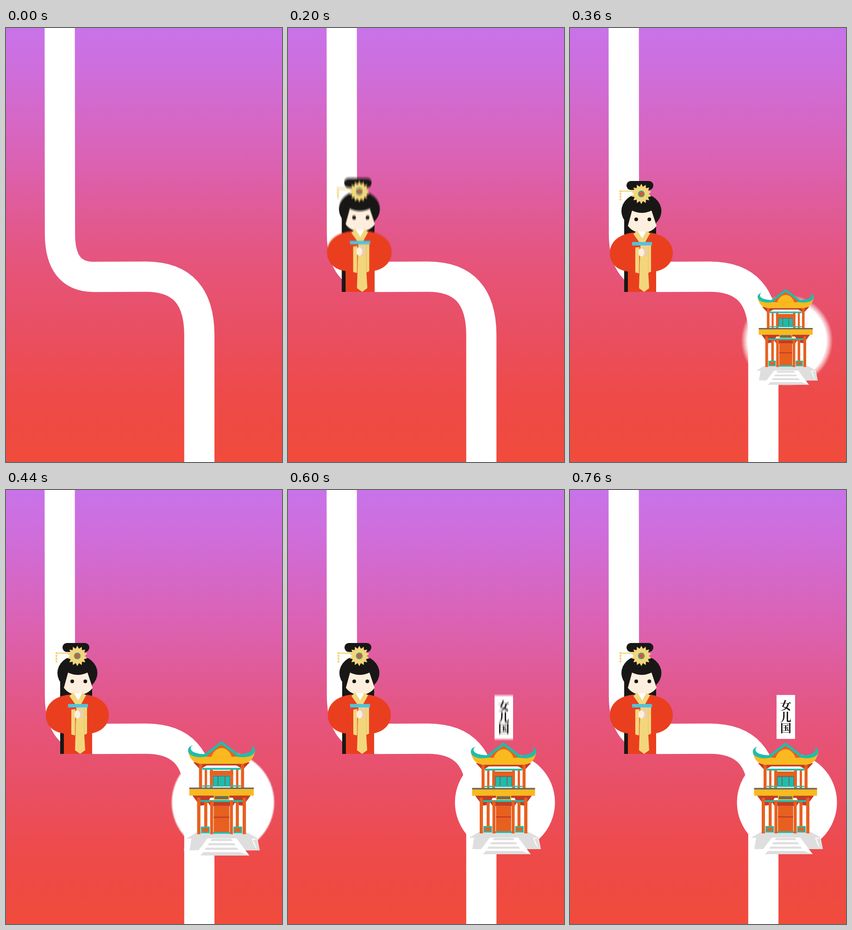
An HTML page with a canvas that plays this animation: 596 by 939 pixels, repeating every 0.8 s.

```html
<!DOCTYPE html>
<html lang="zh">
<head>
<meta charset="utf-8">
<style>
  html, body { margin: 0; width: 100%; height: 100%; overflow: hidden; }
  canvas { display: block; }
</style>
</head>
<body>
<canvas id="stage" width="596" height="939"></canvas>
<script>
const W = 596, H = 939, LOOP = 800, STEP = 40, SHUTTER = 20, SAMPLES = 10;
const screen = document.getElementById('stage').getContext('2d');
const buffer = document.createElement('canvas');
buffer.width = W;
buffer.height = H;
const layer = buffer.getContext('2d');

const BLACK = '#181716', RED = '#ea3f1e', CREAM = '#fdeedd', GOLD = '#f3d67c';
const ORANGE = '#e8601f', BRICK = '#c23c26', YELLOW = '#f9b91f', TEAL = '#1fbdac';
const STONE = '#dedede', SLATE = '#6c6a60';

// [ms, value] keys, linear in between
const POP = [[0, 0], [120, .857], [160, 1.107], [260, .9], [310, 1]];
const LABEL_Y = [[580, 8], [600, 1], [640, -13], [680, -6], [720, 3], [750, 0]];
const PAGODA_START = 240, LABEL_START = 600;

function track(keys, t) {
  if (t <= keys[0][0]) return keys[0][1];
  for (let i = 1; i < keys.length; i++) {
    const [t0, v0] = keys[i - 1], [t1, v1] = keys[i];
    if (t <= t1) return v0 + (v1 - v0) * (t - t0) / (t1 - t0);
  }
  return keys[keys.length - 1][1];
}

function fill(c, color, d) {
  c.fillStyle = color;
  c.fill(new Path2D(d));
}

function stroke(c, color, width, d) {
  c.strokeStyle = color;
  c.lineWidth = width;
  c.stroke(new Path2D(d));
}

function box(c, color, x0, y0, x1, y1) {
  c.fillStyle = color;
  c.fillRect(x0, y0, x1 - x0, y1 - y0);
}

function oval(c, color, x, y, rx, ry = rx) {
  c.fillStyle = color;
  c.beginPath();
  c.ellipse(x, y, rx, ry, 0, 0, Math.PI * 2);
  c.fill();
}

function scaled(c, x, y, s, draw) {
  if (s <= 0) return;
  c.save();
  c.translate(x, y);
  c.scale(s, s);
  c.translate(-x, -y);
  draw(c);
  c.restore();
}

const sky = layer.createLinearGradient(0, 0, 0, H);
[[0, '#c873e9'], [.11, '#cf6dda'], [.32, '#dc61b0'], [.45, '#e15990'],
 [.55, '#e6547a'], [.7, '#e94f62'], [.85, '#ee4a48'], [1, '#f04b3b']]
  .forEach(([at, color]) => sky.addColorStop(at, color));

function drawBackground(c) {
  box(c, sky, 0, 0, W, H);
  stroke(c, '#fff', 65.3, 'M116 -5L116.5 445C116.5 507 140 538.5 190 538.5L302 538C380 538 417.5 580 417.5 665V945');
}

function drawFlower(c, x, y) {
  const points = 14;
  c.fillStyle = GOLD;
  c.beginPath();
  for (let i = 0; i < points * 2; i++) {
    const r = i % 2 ? 16 : 22, a = i * Math.PI / points - Math.PI / 2;
    c.lineTo(x + r * Math.cos(a), y + r * Math.sin(a));
  }
  c.fill();
  oval(c, '#4a9f86', x, y, 7.3);
  oval(c, '#e2532c', x, y, 4.6);
}

function drawDoll(c) {
  // hair and face
  box(c, BLACK, 117, 400, 186, 571);
  c.fillStyle = BLACK;
  c.beginPath();
  c.roundRect(122, 331, 58, 19.5, 9.7);
  c.fill();
  oval(c, BLACK, 154.2, 396, 43.2, 38);
  fill(c, CREAM, 'M134 395Q155 405 176 395L187 428Q176 443 156 443Q136 443 125 428Z');
  oval(c, BLACK, 143, 414, 4);
  oval(c, BLACK, 171.3, 414, 4);

  // hairpin
  stroke(c, GOLD, 2.6, 'M108 353H142');
  for (let i = 0; i < 4; i++) oval(c, GOLD, 109, 353 + i * 6, 2.4);
  drawFlower(c, 154, 359);

  // robe
  box(c, RED, 125, 470, 186, 571);
  fill(c, RED, 'M154 442.5C192 440 222 457 222 487C222 512 200 526 180 527H128C106 526 86 512 86 487C86 457 116 440 154 442.5Z');
  fill(c, '#fff', 'M145 440H166L156 457Z');
  fill(c, GOLD, 'M137 446L145 438L156 455L165 439L173 444L162 464H150Z');
  fill(c, GOLD, 'M141 475L150 474L149 531L141 529Z');
  fill(c, GOLD, 'M152 470H175V527L169 530L171 563L160 571L149 563Z');
  stroke(c, '#dfbd5f', .8, 'M169 472V530M151 500L150 530');
  box(c, '#51c3dc', 134, 463, 177, 470.5);
  fill(c, '#ebcdae', 'M154 474H167V492L158 495Z');
  oval(c, CREAM, 154, 485.5, 6.5, 9);
}

function drawPagodaHalf(c) {
  // upper storey
  fill(c, BRICK, 'M406 591H466V598H434L420 606Z');
  box(c, ORANGE, 418, 594, 424.5, 645);
  box(c, ORANGE, 430, 604, 435, 645);
  box(c, ORANGE, 441, 604, 447, 645);
  box(c, TEAL, 425, 603, 466, 607);
  box(c, ORANGE, 441, 609, 466, 619);
  box(c, SLATE, 447, 619, 466, 641);
  box(c, TEAL, 448.5, 621, 457, 640);
  box(c, TEAL, 459, 621, 466, 640);
  box(c, TEAL, 425, 640, 466, 642.5);

  // balcony and lower storey
  fill(c, BRICK, 'M404 661H466V666H442L434 681L420 683Z');
  box(c, SLATE, 397.5, 644.5, 466, 648);
  box(c, YELLOW, 397.5, 648, 466, 661.5);
  box(c, TEAL, 421, 671, 466, 675);
  fill(c, BRICK, 'M436 675H446V690Z');
  box(c, ORANGE, 429, 675, 435.5, 728);
  box(c, TEAL, 422, 727, 440.5, 741);
  box(c, ORANGE, 425, 730, 438, 738);
  box(c, ORANGE, 414, 666, 421, 743);
  box(c, ORANGE, 441.5, 672, 448, 743);

  // roof
  fill(c, ORANGE, 'M466 547L424 581H466Z');
  stroke(c, TEAL, 5.5, 'M467 548.5L431 576');
  fill(c, YELLOW, 'M394.5 564C403 577 425 580 466 580V594.5H422Q411 594 404 587Q396 579 394.5 564Z');
  fill(c, TEAL, 'M405 556C398 559 399 567 410 571Q426 576 440 572L434 579Q413 583 401 576C391 569 394 557 405 556Z');
}

function drawPagoda(c) {
  // platform and stairs
  fill(c, '#fff', 'M391 752H541L546 777H386Z');
  fill(c, STONE, 'M412 740H520L543 752.5H391Z');
  fill(c, STONE, 'M402 752H436L417 777H398Z');
  fill(c, STONE, 'M497 752H529L534 766L541 777H515Z');
  fill(c, '#fff', 'M437 752H497L524 788H421Z');
  fill(c, STONE, 'M445 753H486L489 757.5H442Z M439 762H492L495 766.5H436Z M433 771.5H498L501 776H430Z M427 781H505L524 788H421Z');
  fill(c, STONE, 'M540 753L545.5 777H541L532 755Z');

  // door
  box(c, BRICK, 448, 675, 484, 684);
  box(c, ORANGE, 449, 683, 482, 741);
  box(c, BRICK, 449, 706, 482, 708.5);

  drawPagodaHalf(c);
  c.save();
  c.transform(-1, 0, 0, 1, 931, 0);
  drawPagodaHalf(c);
  c.restore();

  box(c, TEAL, 448, 738.5, 483, 742);
  box(c, YELLOW, 449, 660, 482, 671);
  box(c, SLATE, 451, 662.5, 480, 669);
  fill(c, YELLOW, 'M444 580C447 569 456 561 465.5 561C475 561 484 569 487 580Z');
}

function drawLabel(c, dy) {
  box(c, '#fff', 446, 443.5 + dy, 486, 538.5 + dy);
  c.fillStyle = '#17120f';
  c.font = '900 24px "Noto Serif CJK SC", "Noto Sans CJK SC", "Noto Sans CJK", serif';
  c.textAlign = 'center';
  c.textBaseline = 'alphabetic';
  [...'女儿国'].forEach((glyph, i) => c.fillText(glyph, 466, 475 + i * 24.6 + dy));
}

// Parts that carry motion blur; `now` decides what is visible, `t` where it is.
function drawBlurred(c, now, t) {
  drawBackground(c);
  if (now > 0) scaled(c, 154, 571, track(POP, t), drawDoll);
  if (now > PAGODA_START) oval(c, '#fff', 468.5, 676, 108 * track(POP, t - PAGODA_START));
  if (now >= LABEL_START) drawLabel(c, track(LABEL_Y, t));
}

function render(now) {
  const still = now === 0 || now >= 760;
  const count = still ? 1 : SAMPLES;
  for (let i = 0; i < count; i++) {
    drawBlurred(layer, now, now + SHUTTER * ((i + .5) / count - .5));
    screen.globalAlpha = 1 / (i + 1);
    screen.drawImage(buffer, 0, 0);
  }
  screen.globalAlpha = 1;
  scaled(screen, 468, 676, track(POP, now - PAGODA_START), drawPagoda);
}

let start = null, shown = -1;
function tick(time) {
  if (start === null) start = time;
  const now = Math.floor((time - start) % LOOP / STEP) * STEP;
  if (now !== shown) render(shown = now);
  requestAnimationFrame(tick);
}
requestAnimationFrame(tick);
</script>
</body>
</html>
```
